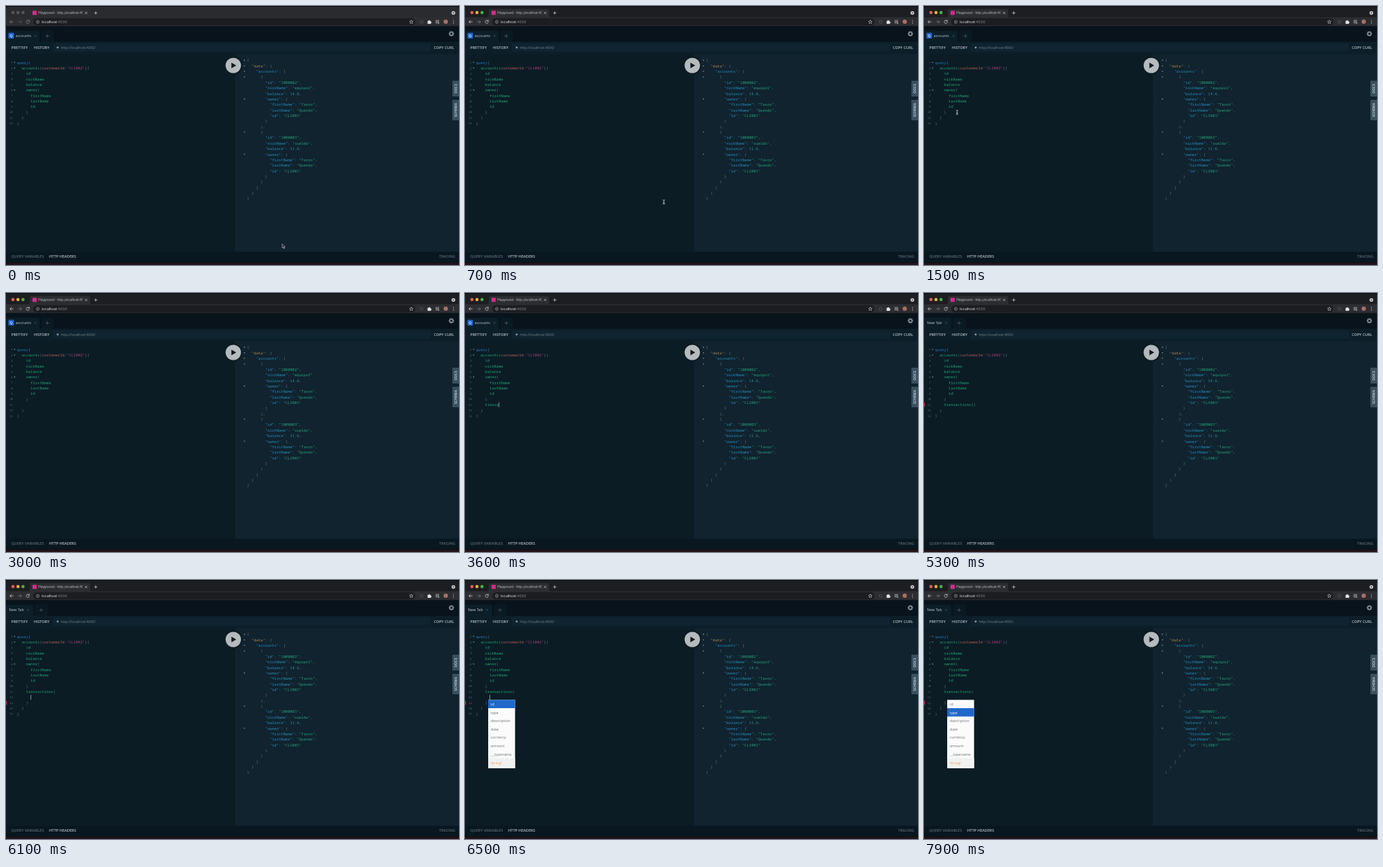
These frames come from a looping animation (684 px wide and 392 px high, 8 s). An HTML page:

```html
<!DOCTYPE html>
<html lang="en">
<head>
<meta charset="utf-8">
<title>Query playground</title>
<style>
  html, body { margin: 0; width: 100%; height: 100%; overflow: hidden; background: #0b0b0e; }
  svg { display: block; width: 684px; height: 392px; }
  text { font: 5.65px "Open Sans", sans-serif; white-space: pre; }
  .code text { font: 5.7px "Noto Sans Mono", monospace; }
  .code .num { font-size: 4.3px; }
  .chrome text { font-family: Inter, sans-serif; }
  .semi { font-weight: 600; }
</style>
</head>
<body>
<svg id="stage" viewBox="0 0 684 392" xmlns="http://www.w3.org/2000/svg"></svg>
<script>
const LOOP = 8000, CHAR = 3.42, LINE = 8.36;
const COLORS = {
  key: '#278fbd', field: '#22a56d', arg: '#b95e58', str: '#a83f79', word: '#2979b8',
  punct: '#64757e', value: '#29a377', number: '#3b91a5', root: '#b98a48'
};
// Keystrokes and clicks in ms
const FOCUS = 100, CLICK = 1900, NEWLINE = 2400, TYPE = 3200, TYPED = 4000,
      BRACES = 4600, RENAME = 5100, EXPAND = 5600, HINTS = 6200, NEXT_HINT = 7800;

const esc = s => String(s).replace(/&/g, '&amp;').replace(/</g, '&lt;');
const rect = (x, y, w, h, fill, more = '') =>
  `<rect x="${x}" y="${y}" width="${w}" height="${h}" fill="${fill}" ${more}/>`;
const circle = (x, y, r, fill, more = '') => `<circle cx="${x}" cy="${y}" r="${r}" fill="${fill}" ${more}/>`;
const path = (d, fill, more = '') => `<path d="${d}" fill="${fill}" ${more}/>`;
const line = (d, color, width = 0.8) =>
  path(d, 'none', `stroke="${color}" stroke-width="${width}" stroke-linecap="round" stroke-linejoin="round"`);
const label = (x, y, s, fill, more = '') => `<text x="${x}" y="${y}" fill="${fill}" ${more}>${esc(s)}</text>`;
const group = (id, body, more = '') => `<g id="${id}" ${more}>${body}</g>`;
const cross = (x, y, r, color) => line(`M${x - r} ${y - r}l${2 * r} ${2 * r}m0 ${-2 * r}l${-2 * r} ${2 * r}`, color, 0.7);
const plus = (x, y, r, color) => line(`M${x - r} ${y}h${2 * r}M${x} ${y - r}v${2 * r}`, color, 0.7);
const fold = (x, y) => path(`M${x - 1.2} ${y - 0.8}h2.4l-1.2 1.8z`, '#84929a');

// tokens: [[kind, text], ...]
const codeLine = (x, y, tokens) => `<text x="${x}" y="${y + 2}">` +
  tokens.map(([kind, s]) => `<tspan fill="${COLORS[kind]}">${esc(s)}</tspan>`).join('') + '</text>';

function browserChrome() {
  const icon = '#c6c8cb';
  return rect(0, 1, 684, 30, '#1d1e21', 'id="strip" rx="4"') +
    path('M32 17.5q4 0 4-4v-6q0-3 3-3h85q3 0 3 3v6q0 4 4 4z', '#2c2d31') +
    rect(0, 17, 684, 13.5, '#2c2d31') +
    rect(41, 18.6, 577, 10.6, '#1c1d20', 'rx="5.3"') +
    [0, 1, 2].map(i => circle(10.5 + 7.6 * i, 10, 2.4, '#555', `id="light${i}"`)).join('') +
    rect(40, 7.2, 6.4, 6.4, '#d32c8b', 'rx="1"') +
    `<clipPath id="titleClip"><rect x="48" y="4" width="68" height="13"/></clipPath>` +
    label(49, 12, 'Playground - http://localhost:4000', '#c5c7ca', 'style="font-size:4.5px" clip-path="url(#titleClip)"') +
    cross(121, 10.5, 1.4, '#d4d5d7') + plus(135.5, 10.5, 2.2, '#d4d5d7') +
    circle(675.5, 10.5, 2.8, '#c6c8cb') + path('M674.1 9.8h2.8l-1.4 1.8z', '#222') +
    group('nav',
      line('M11 24h-5m2.2-2.2l-2.2 2.2l2.2 2.2', icon) +
      line('M18.5 24h5m-2.2-2.2l2.2 2.2l-2.2 2.2', '#7b7d81') +
      line('M35 22.6a2.4 2.4 0 1 0 .3 2M35.2 21.3v1.7h-1.7', icon)) +
    circle(48, 24, 2.2, 'none', 'stroke="#b5b7ba" stroke-width=".6"') + line('M48 24v1M48 22.8v.1', '#b5b7ba', 0.6) +
    `<text x="54" y="26" style="font-size:5.4px" fill="#e3e4e6">localhost<tspan fill="#84878b">:4000</tspan></text>` +
    path('M612 21.2l.8 1.9 2 .1-1.6 1.3.6 2-1.8-1.1-1.8 1.1.6-2-1.6-1.3 2-.1z', 'none', 'stroke="#d5d6d8" stroke-width=".6"') +
    circle(627.5, 24, 2.2, 'none', 'stroke="#55585c" stroke-width=".8"') +
    path('M636.6 22.4h1.5a1 1 0 0 1 2 0h1.4v1.5a1 1 0 0 1 0 2v1h-4.9z', '#e3e4e6') +
    line('M649 22h4.6M649 23.8h4.6M649 25.6h2.4', '#d5d6d8', 0.7) + circle(653.2, 25.8, 0.9, '#d5d6d8') +
    circle(664, 23.8, 3.2, '#a86f63') +
    [21.8, 24, 26.2].map(y => circle(675.7, y, 0.6, '#d5d6d8')).join('');
}

function toolbar() {
  const gear = [...Array(8)].map((_, i) =>
    rect(671.7, 38, 1.6, 2, '#84919a', `transform="rotate(${45 * i} 672.5 42)"`)).join('');
  return rect(0, 30.5, 684, 23.5, '#08131b') +
    group('tabs', '') + gear + circle(672.5, 42, 2.4, 'none', 'stroke="#84919a" stroke-width="1.4"') +
    rect(0, 54, 684, 19, '#0c1e28') +
    rect(71, 56.5, 570, 12.5, '#0f2430', 'rx="1.5"') +
    label(8, 64.8, 'PRETTIFY', '#b9c2c7', 'class="semi"') +
    label(42, 64.8, 'HISTORY', '#b9c2c7', 'class="semi"') +
    circle(78, 62.7, 1.5, '#8d999f') +
    label(83, 64.6, 'http://localhost:4000/', '#75848c', 'style="font-size:5.2px"') +
    label(646, 64.8, 'COPY CURL', '#b9c2c7', 'class="semi"');
}

function response() {
  const account = (id, nickName, balance) => ({
    id, nickName, balance, owner: { firstName: 'Tavro', lastName: 'Quendo', id: 'CLI001' }
  });
  const body = { data: { accounts: [account('1000002', 'equipol', 14.6), account('1000003', 'sueldo', 11.6)] } };
  return JSON.stringify(body, null, 2).split('\n').map((row, i) => {
    const text = row.trimStart(), y = 82.4 + LINE * i;
    const [, key, gap, value, end] = text.match(/^("\w+")?(:? ?)("\w+"|[\d.]+)?(.*)$/);
    const kind = key === '"data"' ? 'root' : 'key';
    const tokens = [[kind, key || ''], ['punct', gap], [/^\d/.test(value) ? 'number' : 'value', value || ''], ['punct', end]];
    return codeLine(364 + CHAR * (row.length - text.length), y, tokens) + (/[{[]$/.test(row) ? fold(360, y) : '');
  }).join('');
}

function sideTab(y, h, text) {
  const mid = y + h / 2;
  return rect(674, y, 11, h, '#38505f', 'rx="1"') +
    label(679, mid + 2, text, '#d5dce0', `class="semi" text-anchor="middle" style="font-size:5.2px" transform="rotate(-90 679 ${mid})"`);
}

function scene() {
  return rect(0, 0, 684, 392, '#0b0b0e') + rect(0, 388.5, 684, 3.5, '#24131a') +
    rect(0, 300, 684, 88, '#091720', 'rx="4"') +
    group('chrome', browserChrome(), 'class="chrome"') + toolbar() +
    rect(0, 73, 346, 299, '#0b1c25') + rect(346, 73, 338, 299, '#10232f') +
    group('editor', '', 'class="code"') + group('result', response(), 'class="code"') +
    circle(343.2, 90, 14, '#0b1c25') + circle(343.2, 90, 11.6, '#b5babd') +
    path('M340.4 85.8v8.4l7.2-4.2z', '#0b1620') +
    sideTab(113, 24, 'DOCS') + sideTab(142, 31, 'SCHEMA') +
    label(8, 381.4, 'QUERY VARIABLES', '#5c6c75', 'class="semi"') +
    label(65, 381.4, 'HTTP HEADERS', '#b9c2c7', 'class="semi"') +
    label(654, 381.4, 'TRACING', '#5c6c75', 'class="semi"') +
    group('hints', '') +
    group('arrow', path('M0 0v6.2l1.5-1.3 1 2.3 1-.4-1-2.3h2z', '#111', 'stroke="#e8e8e8" stroke-width=".6"')) +
    group('ibeam', line('M-1.5 -3.2q1.5 0 1.5 1v4.4q0 1 -1.5 1M1.5 -3.2q-1.5 0 -1.5 1M1.5 3.2q-1.5 0 -1.5 -1M-.8 .8h1.6', '#dfe3e5', 0.7));
}

function tabs(t) {
  const named = t < RENAME, w = named ? 50.5 : 41, fg = '#c4ccd1';
  return path(`M0 54v-16.5h${w - 2}q2 0 2 2v14.5z`, '#0c1e28') +
    (named ? rect(3.5, 40.6, 8.6, 8.6, '#1b64c8', 'rx="1.2"') +
      label(7.8, 47, 'Q', '#fff', 'class="semi" text-anchor="middle"') : '') +
    label(named ? 14.5 : 4.5, 47.2, named ? 'accounts' : 'New Tab', fg) +
    cross(named ? 44.5 : 33.5, 45.2, 1.2, '#4c5b64') +
    rect(w + 2.5, 37.5, 19.5, 16.5, '#0a1922', 'rx="2"') + plus(w + 12, 45.5, 2.4, '#55656e');
}

function editor(t) {
  const rows = [
    [0, ['word', 'query'], ['punct', '{']],
    [1, ['field', 'accounts'], ['punct', '('], ['arg', 'customerId'], ['punct', ':'], ['str', '"CLI002"'], ['punct', '){']],
    [2, ['field', 'id']], [2, ['field', 'nickName']], [2, ['field', 'balance']],
    [2, ['field', 'owner'], ['punct', '{']],
    [3, ['field', 'firstName']], [3, ['field', 'lastName']], [3, ['field', 'id']],
    [2, ['punct', '}']]
  ];
  const word = 'transactions', expanded = t >= EXPAND;
  const count = t < TYPE ? 0 : Math.min(word.length, 1 + Math.floor((t - TYPE) / (TYPED - TYPE) * (word.length - 1)));
  if (t >= NEWLINE) {
    const brace = t < BRACES ? '' : expanded ? '{' : '{}';
    rows.push([2, ['field', word.slice(0, count)], [expanded ? 'punct' : 'field', brace]]);
  }
  if (expanded) rows.push([3], [2, ['punct', '}']]);
  rows.push([1, ['punct', '}']], [0, ['punct', '}']]);

  const at = i => 85.6 + LINE * i, left = depth => 16.6 + CHAR * 2 * depth;
  let out = rows.map(([depth, ...tokens], i) =>
    label(i < 9 ? 7.6 : 5.2, at(i) + 1.6, i + 1, '#5b6b74', 'class="num"') +
    codeLine(left(depth), at(i), tokens) + ([0, 1, 5].includes(i) ? fold(13, at(i)) : '')).join('');

  if (t >= BRACES + 100) out += rect(0, at(expanded ? 12 : 10) - 3, 1.3, 6, '#c33145');

  const typing = t >= TYPE && t < TYPED ? t : 0;
  const last = Math.max(typing, ...[CLICK, NEWLINE, TYPED, BRACES, EXPAND, HINTS].filter(e => e <= t));
  if (t >= CLICK && (t - last) % 1060 < 530) {
    const [row, x] = t < NEWLINE ? [9, left(2) + CHAR]
      : expanded ? [11, left(3)]
      : [10, left(2) + CHAR * (count + (t >= BRACES ? 1 : 0))];
    out += rect(x, at(row) - 3.6, 0.7, 7.2, '#c4ccd1');
  }
  return out;
}

function hints(t) {
  if (t < HINTS) return '';
  const names = ['id', 'type', 'description', 'date', 'currency', 'amount', '__typename'];
  const picked = t < NEXT_HINT ? 0 : 1, pitch = 12.6;
  return rect(35, 181.4, 40.6, 103.4, '#fbfbfb') +
    rect(35, 181.4 + pitch * picked, 40.6, pitch, '#2069c9') +
    names.map((name, i) => label(39, 190 + pitch * i, name, i === picked ? '#fff' : '#697178')).join('') +
    rect(35, 269.6, 40.6, 15.2, '#f0f1f1') + label(39, 279.4, 'String!', '#f2a04a');
}

const stage = document.getElementById('stage');
stage.innerHTML = scene();
const el = id => document.getElementById(id);
const ease = p => p * p * (3 - 2 * p);
const clamp = p => Math.max(0, Math.min(1, p));

function setHtml(id, html) {
  const node = el(id);
  if (node.shown !== html) node.innerHTML = node.shown = html;
}

function render(t) {
  const focused = t >= FOCUS;
  el('strip').setAttribute('fill', focused ? '#1d1e21' : '#292b2f');
  ['#ee5c54', '#e5b53a', '#45b649'].forEach((c, i) => el('light' + i).setAttribute('fill', focused ? c : '#53565a'));
  el('nav').setAttribute('opacity', focused ? 1 : 0.55);
  setHtml('tabs', tabs(t));
  setHtml('editor', editor(t));
  setHtml('hints', hints(t));

  const p = ease(clamp((t - 400) / 800));
  const x = 417 + (50 - 417) * p, y = 360 + (161 - 360) * p;
  const overEditor = x < 340;
  for (const [id, on] of [['arrow', !overEditor], ['ibeam', overEditor && t < NEWLINE]]) {
    el(id).setAttribute('transform', `translate(${x} ${y})`);
    el(id).setAttribute('visibility', on ? 'visible' : 'hidden');
  }
}

const start = performance.now();
function tick() {
  render((performance.now() - start) % LOOP);
  requestAnimationFrame(tick);
}
render(0);
requestAnimationFrame(tick);
</script>
</body>
</html>
```
